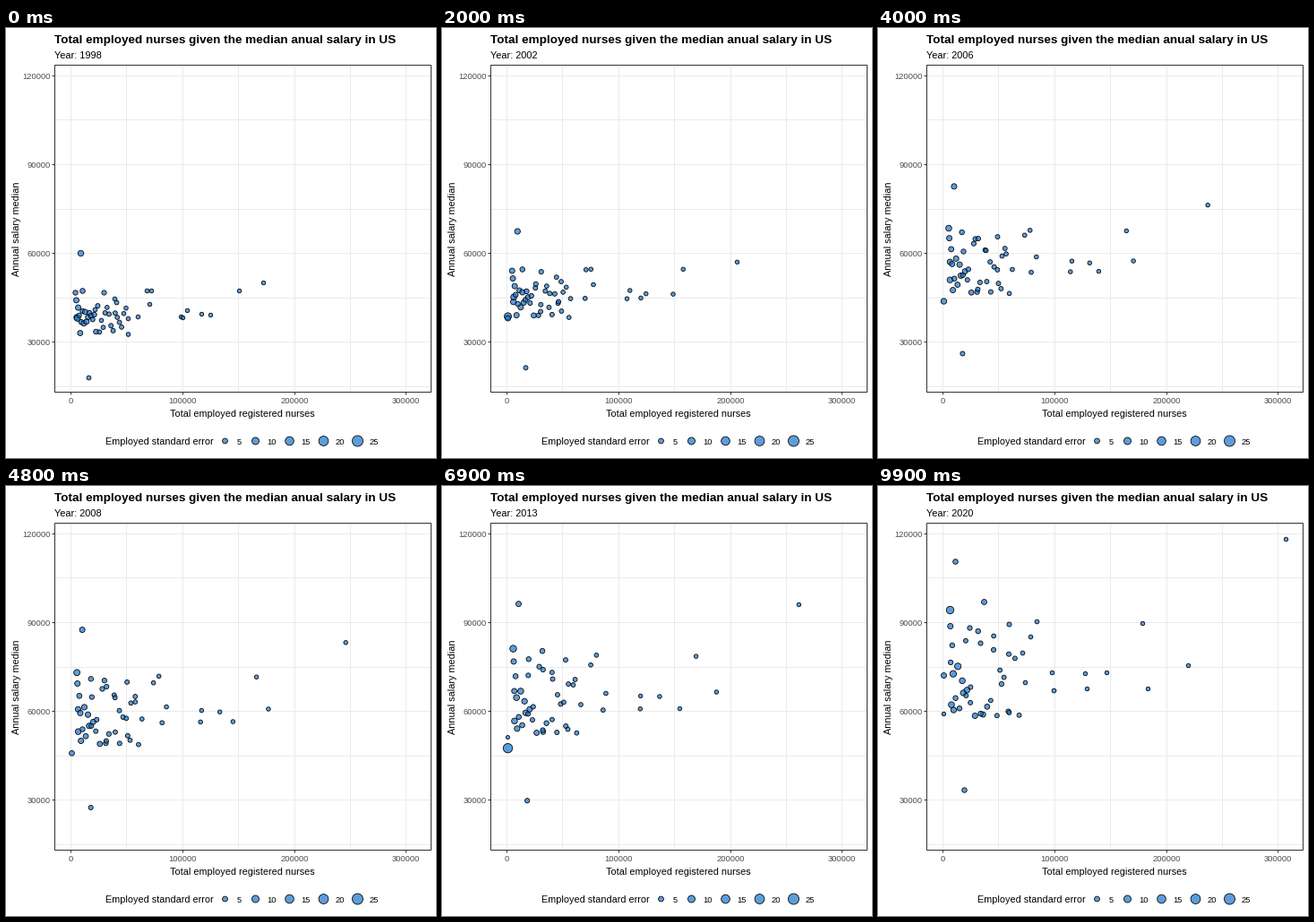
A matplotlib script that plays this animation: 480 px wide and 480 px high, repeating every 10000 ms.

```python
import matplotlib.pyplot as plt
import numpy as np
from matplotlib.animation import FuncAnimation
from matplotlib.patches import Rectangle

SIZE, FRAMES = 480, 100
FIRST, LAST = 1998, 2020
BLUE, GREY, DARK, GRID = "#1874CDB3", "#4D4D4D", "#333333", "#EBEBEB"
plt.rcParams["font.family"] = "Liberation Sans"

# Shared progress of staff numbers and of salaries over the run.
KEYS = [0, 20, 40, 57, 69, 86, 99]
STAFF = [0, 0.25, 0.48, 0.62, 0.66, 0.88, 1]
SALARY = [0, 0.22, 0.53, 0.72, 0.77, 0.89, 1]

# States that stand apart: first and last x, y in stage pixels.
OUTER = [
    (287, 284, 455, 59), (260, 293, 295, 153), (228, 320, 346, 200),
    (195, 322, 301, 226), (218, 319, 255, 208), (202, 315, 231, 209),
    (197, 323, 233, 226), (160, 308, 194, 208), (162, 293, 177, 151),
    (157, 293, 170, 168), (147, 322, 196, 228), (136, 324, 164, 219),
    (123, 306, 161, 186), (121, 302, 146, 154), (99, 314, 118, 129),
    (109, 295, 114, 175), (85, 293, 102, 158), (83, 251, 86, 84),
    (77, 295, 80, 138), (92, 390, 96, 339),
]

# Dots passing at the left edge: frames, heights, radii.
VISITS = [
    (5, 75, 334, 275, 4.6, 1.8),
    (10, 30, 335, 312, 3.0, 3.0),
    (50, 81, 256, 315, 5.0, 5.3),
    (90, 99, 218, 211, 3.0, 3.0),
    (90, 99, 258, 254, 2.2, 2.2),
]


def crowd(n, rng):
    """Smaller states: dense near the left, better paid ones climb higher."""
    u = np.linspace(0, 1, n)
    pay = rng.permutation(u)
    x0 = 78 + 58 * u ** 1.4
    x1 = 72 + (x0 - 72) * rng.uniform(1.15, 1.5, n)
    y0 = 336 - 28 * pay + rng.normal(0, 4, n)
    y1 = 256 - 100 * pay ** 1.8
    return np.column_stack([x0, y0, x1, y1])


rng = np.random.default_rng(8)
X0, Y0, X1, Y1 = np.vstack([OUTER, crowd(33, rng)]).T
LAG = 1 + np.maximum(Y0 - Y1 - 100, 0) / 250
SMALL = np.exp(-(X0 - 72) / 30)
R0 = 2.25 + SMALL * rng.uniform(0.3, 1.5, len(X0))
R1 = 2.25 + SMALL * rng.uniform(0.3, 2.3, len(X0))


def dots(i):
    """Positions and radii of every dot at frame i."""
    x = X0 + (X1 - X0) * np.interp(i, KEYS, STAFF)
    y = Y0 + (Y1 - Y0) * np.interp(i, KEYS, SALARY) ** LAG
    r = R0 + (R1 - R0) * i / (FRAMES - 1)
    guests = [(73, np.interp(i, (a, b), (ya, yb)), np.interp(i, (a, b), (ra, rb)))
              for a, b, ya, yb, ra, rb in VISITS if a <= i <= b]
    return np.vstack([np.column_stack([x, y, r]), *guests])


fig = plt.figure(figsize=(SIZE / 72, SIZE / 72), dpi=72, facecolor="white")
ax = fig.add_axes([0, 0, 1, 1])
ax.set(xlim=(0, SIZE), ylim=(SIZE, 0))
ax.axis("off")


def line(x0, y0, x1, y1, color):
    ax.plot([x0 + 0.5, x1 + 0.5], [y0 + 0.5, y1 + 0.5], color=color, lw=1,
            solid_capstyle="butt", snap=False, zorder=1)


def label(x, y, text, size=10.85, **kw):
    return ax.text(x, y, text, fontsize=size, va=kw.pop("va", "baseline"), **kw)


def bubbles(x, y, r):
    return ax.scatter(x, y, s=(2 * np.asarray(r)) ** 2, facecolor=BLUE,
                      edgecolor="black", linewidth=0.8, snap=False, zorder=3)


L, R, T, B = 54, 474, 41, 406
for k in range(7):
    x = round(72 + 62.4 * k)
    line(x, T, x, B, GRID)
    if k % 2 == 0:
        line(x, B, x, B + 3, DARK)
        label(x, 419, str(k * 50000), 9.4, color=GREY, ha="center")
for k in range(8):
    y = round(400 - 49.6 * k)
    line(L, y, R, y, GRID)
    if k % 2:
        line(L - 3, y, L, y, DARK)
        label(49.5, y + 4, str(15000 * (k + 1)), 9.4, color=GREY, ha="right")
ax.add_patch(Rectangle((L + 0.5, T + 0.5), R - L, B - T, fill=False, ec=DARK,
                       lw=1, snap=False, zorder=4))

label(54, 17, "Total employed nurses given the median anual salary in US", 13.45,
      weight="bold")
year = label(54, 34, "", 11)
label(263.5, 434, "Total employed registered nurses", ha="center")
label(12.5, 224, "Annual salary median", rotation=90, ha="center", va="center")

label(111, 465, "Employed standard error")
KEY_X = [244.5, 278.5, 316.5, 354.5, 392.5]
bubbles(KEY_X, [461] * 5, [2.9, 4, 4.8, 5.4, 6])
for k, x in enumerate(KEY_X):
    label(x + 13, 465, str(5 * k + 5), 9.4)

cloud = bubbles([], [], [])


def update(i):
    d = dots(i)
    cloud.set_offsets(d[:, :2] + 0.5)
    cloud.set_sizes((2 * d[:, 2]) ** 2)
    year.set_text(f"Year: {FIRST + (LAST - FIRST) * i // (FRAMES - 1)}")
    return cloud, year


anim = FuncAnimation(fig, update, frames=FRAMES, interval=100, repeat=True,
                     repeat_delay=0, blit=False)
plt.show()
```
